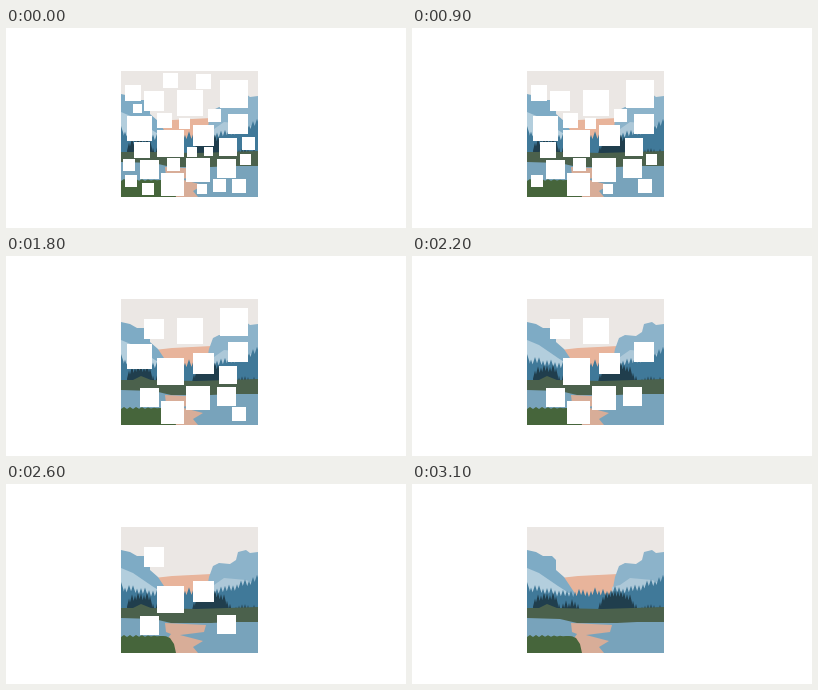
An HTML page that plays this animation: 400 by 200 pixels, repeating every 3600 ms.

```html
<!DOCTYPE html>
<html lang="en">
<head>
<meta charset="utf-8">
<title>Landscape reveal</title>
<style>
  html, body { margin: 0; width: 100%; height: 100%; overflow: hidden; background: #fff; }
  svg { display: block; width: 100vw; height: 100vh; }
</style>
</head>
<body>
<svg viewBox="0 0 400 200">
  <defs><clipPath id="frame"><rect x="115" y="43" width="137" height="126"/></clipPath></defs>
  <g id="scene" clip-path="url(#frame)"></g>
  <g id="tiles" fill="#fff"></g>
</svg>
<script>
const LOOP = 3600, STEP = 100;
const LEFT = 115, RIGHT = 252, TOP = 43, BOTTOM = 169, GROUND = 126;

let seed = 7;
const random = () => (seed = (seed * 16807) % 2147483647) / 2147483647;

function add(parent, name, attributes) {
  const node = document.createElementNS('http://www.w3.org/2000/svg', name);
  for (const key in attributes) node.setAttribute(key, attributes[key]);
  return document.getElementById(parent).appendChild(node);
}

const shape = (fill, d) => add('scene', 'path', { fill, d });

// A skyline through a few points, filled down to the bottom edge.
function layer(fill, skyline) {
  const startX = skyline.split(',')[0];
  shape(fill, `M${skyline}V${BOTTOM}H${startX}Z`);
}

// A row of pointed trees whose tips follow the curve tip(x).
function forest(fill, from, to, step, tip) {
  let d = '';
  for (let x = from; x <= to; x += step) {
    const y = tip(x) + (random() - .5) * 5;
    d += `M${x} ${y}l${step * .65} 8V${GROUND}h${-step * 1.3}V${y + 8}Z`;
  }
  shape(fill, d);
}

// A rounded group of dark trees.
function clump(center, halfWidth, height) {
  forest('#203e4d', center - halfWidth, center + halfWidth, 3, x =>
    GROUND - height * Math.sqrt(1 - ((x - center) / halfWidth) ** 2));
}

layer('#ebe7e4', `${LEFT},${TOP} ${RIGHT},${TOP}`);
layer('#e8b49b', '148,94 166,92 206,90');
layer('#7eabc5', '115,66 124,68 131,72 140,72 144,76 144,86 152,93 162,108');
layer('#8cb3ca', '201,104 203,93 207,82 213,79 224,80 230,76 232,68 240,66 244,69 252,68');
layer('#b3cedd', '115,84 127,89 146,102 160,111');
layer('#adc8d8', '200,103 208,101 218,94 240,96 252,101');

forest('#407999', LEFT, RIGHT, 4, x => 106 - 11 * ((x - 168) / 75) ** 2);
clump(134, 14, 18);
clump(158, 10, 9);
clump(205, 20, 19);
clump(240, 13, 6);

layer('#4b614c', '115,124 127,124 135,120 145,124 190,125 252,123');
layer('#78a3bb', '115,134 148,135 165,139 205,139 225,138 252,138');
shape('#d8ad98', 'M159 139L200 141 198 148 174 151 197 157 187 163 192 169H168L162 154 165 150 160 148Z');

let meadow = '';
for (let x = LEFT; x < 162; x += 3) meadow += `${x},${152 + Math.sin(x)} `;
layer('#46653b', meadow + '164,154 168,160 170,169');

// White squares [x, y, size] in the order they vanish.
const tiles = [
  [207, 151, 13], [136, 155, 12], [117, 131, 12], [127, 76, 9], [181, 119, 10], [198, 119, 9],
  [236, 109, 13], [190, 46, 15], [157, 45, 15],
  [202, 81, 13], [173, 90, 11], [128, 114, 16], [161, 130, 13], [191, 156, 10],
  [119, 147, 12], [234, 126, 11], [151, 85, 15], [119, 57, 16],
  [214, 52, 28], [121, 88, 25], [213, 110, 18], [226, 151, 14],
  [155, 145, 23], [180, 130, 24], [222, 86, 20], [171, 62, 26],
  [138, 63, 20], [187, 97, 21], [151, 102, 27], [134, 132, 19], [211, 131, 19]
];

tiles.forEach(([x, y, size], i) => {
  const offset = (i + 1) * STEP / LOOP;
  add('tiles', 'rect', { x, y, width: size, height: size }).animate(
    [{ opacity: 1, offset: 0 }, { opacity: 1, offset }, { opacity: 0, offset }, { opacity: 0, offset: 1 }],
    { duration: LOOP, iterations: Infinity }
  );
});
</script>
</body>
</html>
```
